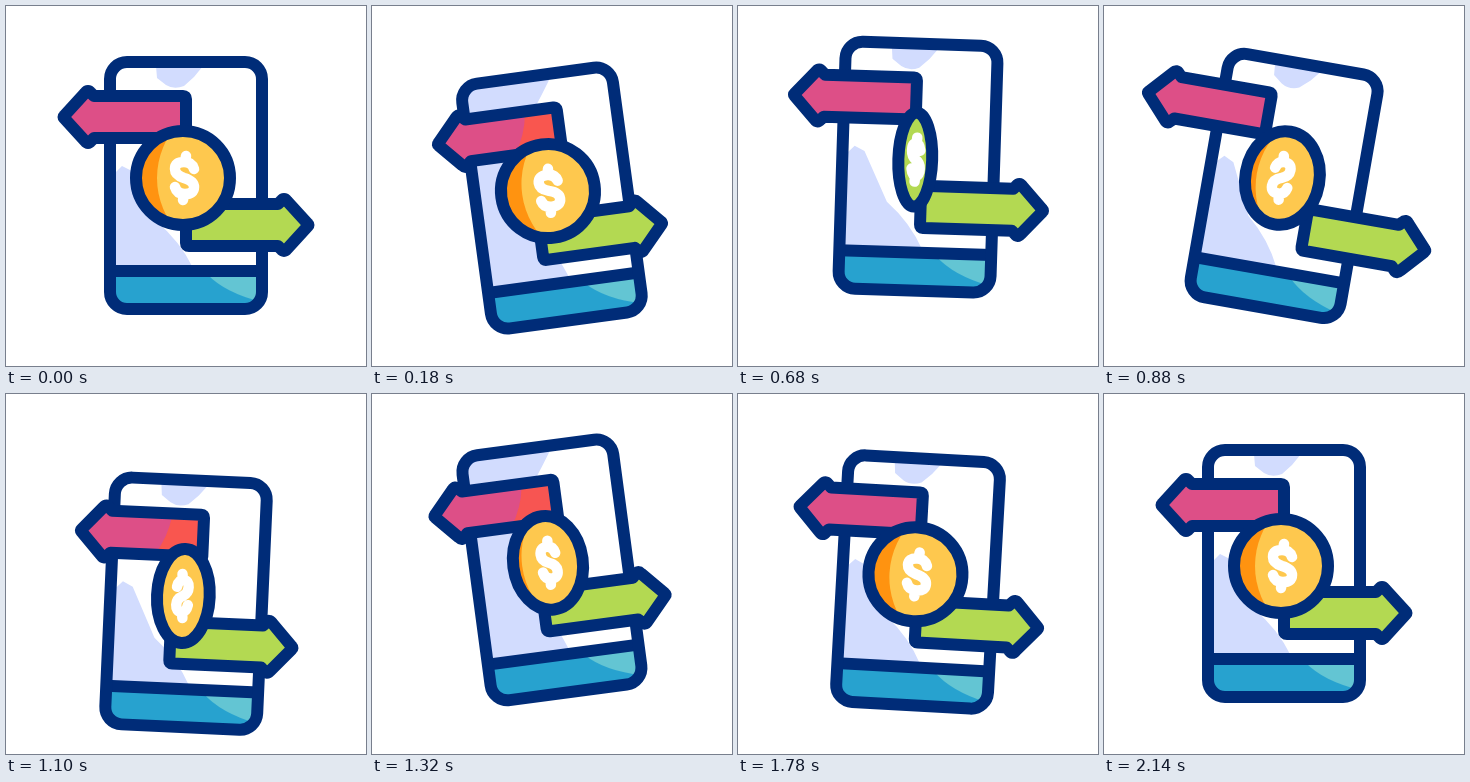
Write an HTML page that moves like this. It is 360 px wide and 360 px high and loops after 2.4 s.

```html
<!DOCTYPE html>
<html lang="en">
<head>
<meta charset="utf-8">
<title>Mobile transfer</title>
<style>
  html, body { margin: 0; width: 100%; height: 100%; overflow: hidden; background: #fff; }
  svg { display: block; width: 100%; height: 100%; }
  .line { stroke: #002c78; stroke-width: 12; stroke-linejoin: round; fill: none; }
</style>
</head>
<body>
<svg viewBox="0 0 360 360">
  <defs>
    <clipPath id="face"><ellipse id="faceClip" rx="42" ry="42"/></clipPath>
    <clipPath id="screen"><rect x="104" y="56" width="152" height="247" rx="17"/></clipPath>
    <path id="arrow" d="M58 112 Q57 111 58 110 L79 87 Q82 83 85 87 L88 90 H177 Q180 90 180 93 V132 H88 L85 135 Q82 139 79 135 Z"/>
  </defs>
  <g id="phone">
    <g clip-path="url(#screen)">
      <rect x="104" y="56" width="152" height="247" fill="#fff"/>
      <path id="shade" fill="#d2dcfe"/>
      <rect x="104" y="265" width="152" height="40" fill="#27a2cf"/>
      <path d="M201 268 Q219 287 256 296 V268 Z" fill="#63c5d3"/>
    </g>
    <path class="line" d="M104 265 H256"/>
    <rect class="line" x="104" y="56" width="152" height="247" rx="17"/>
    <g id="send">
      <use href="#arrow" fill="#dd4f87"/>
      <path id="glow" d="M148 92 Q145 114 132 132 H179 V91 Z" fill="#f9564f"/>
      <use href="#arrow" class="line"/>
    </g>
    <g id="receive">
      <g transform="rotate(180 180 165)">
        <use href="#arrow" fill="#b3d952"/>
        <use href="#arrow" class="line"/>
      </g>
    </g>
    <g transform="translate(177 172)">
      <g clip-path="url(#face)">
        <rect x="-48" y="-48" width="96" height="96" fill="#ff9310"/>
        <circle id="gold" cx="54" r="80"/>
      </g>
      <ellipse id="rim" class="line" ry="47"/>
      <path id="dollar" d="M3 -22 L2 -16 M11 -9 Q9 -16 1 -16 Q-8 -16 -8 -9 Q-8 -3 1 0 Q11 3 11 9 Q11 16 2 16 Q-6 16 -8 9 M1 16 L0 22"
        fill="none" stroke="#fff" stroke-width="10.5" stroke-linecap="round" stroke-linejoin="round" vector-effect="non-scaling-stroke"/>
    </g>
  </g>
</svg>
<script>
const LOOP = 2400;
const $ = id => document.getElementById(id);
const clamp = v => Math.min(1, Math.max(0, v));

const shades = {
  full: 'M104 56 H197 Q184 76 172 92 L165 215 Q178 237 187 262 H104 Z',
  part: 'M150 60 H197 L188 71 L178 80 Q168 84 160 79 L151 72 Z M109 167 L116 160 L126 165 L150 215 Q174 235 187 262 H106 V170 Z'
};

// A swing eases in and out between its turning points [ms, value].
function swing(...turns) {
  return t => {
    let [t0, v] = [0, 0];
    for (const [t1, next] of turns) {
      v += (next - v) * (1 - Math.cos(Math.PI * clamp((t - t0) / (t1 - t0)))) / 2;
      if (t < t1) break;
      t0 = t1;
    }
    return v;
  };
}

const liftAt = swing([400, 29.5], [730, -21], [1070, 31], [1400, -9], [1780, 8.5], [2140, 0]);
const tiltAt = swing([380, -16.7], [860, 10], [1420, -9], [1780, 3.2], [2140, 0]);
const slideAt = swing([380, 36], [900, -28], [1160, 20], [1560, 0]);
const spinAt = t => 360 * clamp((t - 520) / 900);

function set(id, attrs) {
  for (const name in attrs) $(id).setAttribute(name, attrs[name]);
}

function draw(t) {
  const tilt = tiltAt(t);
  const slide = slideAt(t);
  const spin = spinAt(t);
  const turn = Math.cos(spin * Math.PI / 180);
  const width = Math.abs(turn);

  set('phone', { transform: `translate(0 ${liftAt(t)}) rotate(${tilt} 180 180)` });
  set('send', { transform: `translate(${slide} 0)` });
  set('receive', { transform: `translate(${-slide} 0)` });
  set('glow', { opacity: clamp(slide / 14) });
  set('shade', { d: tilt < -3 ? shades.full : shades.part });

  set('rim', { rx: Math.max(1, 53 * width - 6) });
  set('faceClip', { rx: Math.max(0.5, 53 * width - 10) });
  set('gold', { fill: spin > 30 && spin < 90 ? '#b3d952' : '#fec84e' });
  set('dollar', {
    transform: `scale(${turn || 0.001} 1)`,
    visibility: width < 0.2 ? 'hidden' : 'visible'
  });
}

const start = performance.now();
function tick() {
  draw((performance.now() - start) % LOOP);
  requestAnimationFrame(tick);
}
tick();
</script>
</body>
</html>
```
